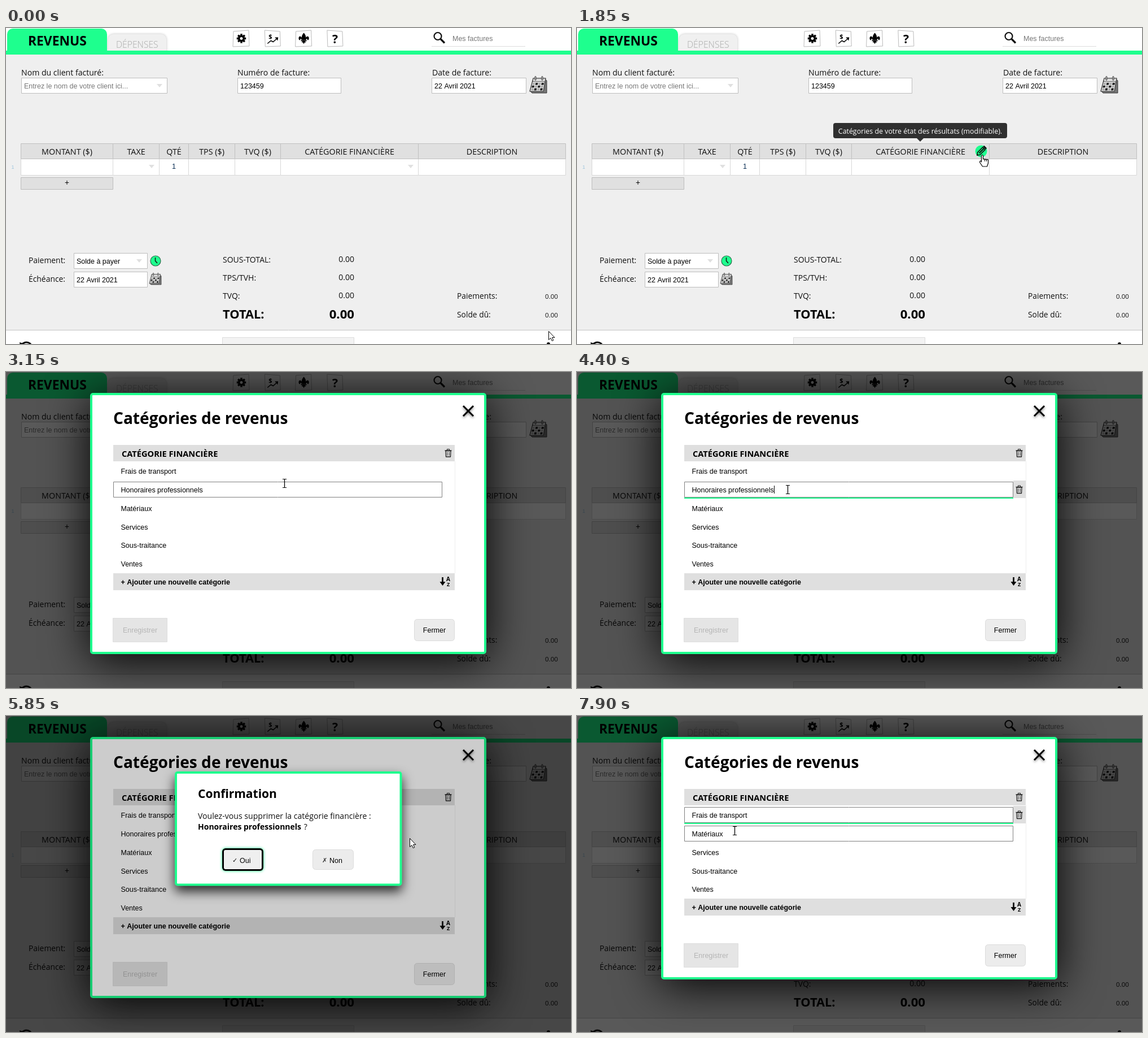
Animation, 1001 px wide and 559 px high, one loop 8000 ms. Source, as an HTML page with a canvas:

```html
<!DOCTYPE html>
<html lang="fr">
<head>
<meta charset="utf-8">
<style>
html, body { margin: 0; width: 100%; height: 100%; overflow: hidden; background: #efefef; }
canvas { display: block; width: 1001px; height: 559px; }
</style>
</head>
<body>
<canvas id="stage" width="1001" height="559"></canvas>
<script>
const c = document.getElementById('stage').getContext('2d');
const LOOP = 8000, GREEN = '#1eff8e', TAU = Math.PI * 2;
const UI = '"Open Sans", "Noto Sans", sans-serif';
const ARIAL = '"Liberation Sans", Arial, sans-serif';
const MONO = '"Liberation Mono", monospace';
const ROW = 32.8, ROWS_TOP = 159.2;
const categories = ['Frais de transport', 'Honoraires professionnels', 'Matériaux',
  'Services', 'Sous-traitance', 'Ventes'];

const ramp = (t, from, to) => Math.min(1, Math.max(0, (t - from) / (to - from)));

function text(s, x, y, font, color = '#111', align = 'left') {
  c.font = font;
  c.fillStyle = color;
  c.textAlign = align;
  c.fillText(s, x, y);
}
const ui = (s, x, y, size = 14.1, color, align) => text(s, x, y, `${size}px ${UI}`, color, align);
const bold = (s, x, y, size, color, align) => text(s, x, y, `bold ${size}px ${UI}`, color, align);
const arial = (s, x, y, color, align) => text(s, x, y, `12.5px ${ARIAL}`, color, align);

function box(x, y, w, h, fill, border, r = 0) {
  c.beginPath();
  c.roundRect(border ? x + .5 : x, border ? y + .5 : y, border ? w - 1 : w, border ? h - 1 : h, r);
  if (fill) { c.fillStyle = fill; c.fill(); }
  if (border) { c.strokeStyle = border; c.lineWidth = 1; c.stroke(); }
}
function poly(points, fill, stroke, width = 1, close = true) {
  c.beginPath();
  points.forEach(([x, y]) => c.lineTo(x, y));
  if (close) c.closePath();
  if (fill) { c.fillStyle = fill; c.fill(); }
  if (stroke) { c.strokeStyle = stroke; c.lineWidth = width; c.stroke(); }
}
const line = (x1, y1, x2, y2, color, width = 1) =>
  poly([[x1, y1], [x2, y2]], null, color, width, false);
function disc(x, y, r, fill, stroke, width = 1) {
  c.beginPath();
  c.arc(x, y, r, 0, TAU);
  if (fill) { c.fillStyle = fill; c.fill(); }
  if (stroke) { c.strokeStyle = stroke; c.lineWidth = width; c.stroke(); }
}
function at(x, y, draw, scale = 1, angle = 0) {
  c.save();
  c.translate(x, y);
  c.rotate(angle);
  c.scale(scale, scale);
  draw();
  c.restore();
}
function withShadow(color, blur, dy, draw) {
  c.save();
  c.shadowColor = color;
  c.shadowBlur = blur;
  c.shadowOffsetY = dy;
  draw();
  c.restore();
}
const dropArrow = (x, y) => poly([[x - 5, y - 3], [x + 5, y - 3], [x, y + 3]], '#e0e0e0');

function calendar(x, y, scale) {
  at(x, y, () => {
    poly([[26, 5], [30, 8], [30, 30], [4, 30], [1, 27]], '#777', '#333');
    poly([[6, 4], [28, 4], [24, 27], [0, 27]], '#f4f4f4', '#333', 1.2);
    poly([[6, 4], [28, 4], [27, 10], [5, 10]], '#ddd', '#444');
    for (let row = 0; row < 3; row++)
      for (let col = 0; col < 4; col++) {
        const px = 5 + col * 5.3 - row * 1.1, py = 12 + row * 4.8;
        poly([[px, py], [px + 4.3, py], [px + 3.6, py + 3.8], [px - .7, py + 3.8]],
          (row + col) % 2 ? '#222' : '#aaa');
      }
    [10, 22].forEach(px => box(px - 1.5, 0, 3, 8, '#eee', '#333', 1));
  }, scale);
}

function trash(x, y) {
  c.lineJoin = 'round';
  poly([[x - 4.5, y - 4], [x + 4.5, y - 4], [x + 4, y + 6.5], [x - 4, y + 6.5]], null, '#222', 1.3);
  line(x - 6, y - 4.5, x + 6, y - 4.5, '#222', 1.4);
  poly([[x - 2, y - 5], [x - 2, y - 7], [x + 2, y - 7], [x + 2, y - 5]], null, '#222', 1.1, false);
  [-1.7, 1.7].forEach(d => line(x + d, y - 2, x + d, y + 4.5, '#222', 1));
}

function gear() {
  for (let i = 0; i < 8; i++) at(0, 0, () => box(-1.8, -8.2, 3.6, 5, '#000'), 1, i * TAU / 8);
  disc(0, 0, 4.3, null, '#000', 3.6);
}
function chart() {
  text('$', -4, 0, `bold 11px ${UI}`, '#000', 'center');
  poly([[-9, 9], [-3, 4], [1, 6], [9, -1]], null, '#000', 1.5, false);
  poly([[4, -2], [10, -2], [9, 4]], '#000');
}
function lily() {
  c.fillStyle = '#000';
  c.beginPath();
  c.moveTo(0, -10);
  c.bezierCurveTo(5, -4, 4, -1, 1.8, 3);
  c.lineTo(-1.8, 3);
  c.bezierCurveTo(-4, -1, -5, -4, 0, -10);
  c.fill();
  [-1, 1].forEach(s => {
    c.beginPath();
    c.moveTo(s * 2, 3);
    c.bezierCurveTo(s * 3, -5, s * 10, -6, s * 9, 1);
    c.bezierCurveTo(s * 8, 4, s * 6, 3, s * 6, 1);
    c.bezierCurveTo(s * 5, 0, s * 4, 1, s * 4, 3);
    c.fill();
  });
  box(-5, 3, 10, 1.8, '#000');
  poly([[-1.5, 4], [1.5, 4], [4, 7], [1.5, 7], [0, 10], [-1.5, 7], [-4, 7]], '#000');
}
const help = () => text('?', 0, 8, `bold 21px ${UI}`, '#000', 'center');

function header() {
  box(0, 0, 1001, 40, '#fff');
  withShadow('rgba(0,0,0,.25)', 4, 0, () => box(181, 11, 103, 40, '#f0f0f0', null, 9));
  text('DÉPENSES', 195, 35, `300 15.7px ${UI}`, '#aaa');
  box(2, 1, 177, 50, GREEN, null, 10);
  box(0, 40, 1001, 7, GREEN);
  box(0, 47, 1001, 10, '#efefef');
  bold('REVENUS', 39, 31, 22.8, '#000');
  [gear, chart, lily, help].forEach((icon, i) => {
    const x = 402 + i * 55.3, tilt = i % 2 ? 1 : -1;
    poly([[x + 1, 5 - tilt], [x + 28, 5 + tilt], [x + 29, 32], [x + 1 + tilt, 33]], '#fff', '#bbb');
    at(x + 15, 18.5, icon);
  });
  disc(765, 14.5, 6.5, null, '#111', 2.2);
  line(770, 19.5, 777, 26.5, '#111', 3.2);
  arial('Mes factures', 791, 22.5, '#777');
  line(754, 32.5, 920, 32.5, '#ddd');
}

function field(x, y, w, h, value, color) {
  box(x, y, w, h, '#fff', '#bdbdbd');
  arial(value, x + 5, y + h / 2 + 5, color);
}

function invoiceTable(hot) {
  const cols = [26, 189, 271, 323, 405, 486, 730, 991];
  const titles = ['MONTANT ($)', 'TAXE', 'QTÉ', 'TPS ($)', 'TVQ ($)', 'CATÉGORIE FINANCIÈRE', 'DESCRIPTION'];
  titles.forEach((title, i) => {
    const x = cols[i], w = cols[i + 1] - x + 1;
    box(x, 231, w, 30, '#fff', '#d8d8d8');
    box(x, 204, w, 28, '#e0e0e0', '#c0c0c0');
    ui(title, x + w / 2, 224, 14.3, '#111', 'center');
  });
  text('1', 12, 249, `9px ${ARIAL}`, '#9cc4de', 'center');
  arial('1', 297.5, 249, '#0b2f55', 'center');
  dropArrow(258, 245);
  if (!hot) dropArrow(717, 245);
  box(26, 264, 164, 22, '#e0e0e0', '#bcbcbc');
  ui('+', 108, 279, 14, '#000', 'center');
}

function page(hot) {
  box(0, 0, 1001, 559, '#efefef');
  header();
  ui('Nom du client facturé:', 27, 84);
  field(27, 88, 259, 28, 'Entrez le nom de votre client ici...', '#777');
  dropArrow(272, 102);
  ui('Numéro de facture:', 410, 84);
  field(410, 88, 184, 28, '123459', '#000');
  ui('Date de facture:', 755, 84);
  field(754, 88, 168, 28, '22 Avril 2021', '#000');
  calendar(928, 85, 1);
  invoiceTable(hot);

  ui('Paiement:', 40, 416, 13.9);
  field(120, 398, 131, 28, 'Solde à payer', '#000');
  dropArrow(236, 412);
  disc(265, 412, 9, GREEN, '#2a6b4b', 1.2);
  poly([[264.5, 406], [264.5, 412], [268, 416]], null, '#111', 1.5, false);
  ui('Échéance:', 40, 449, 13.9);
  field(120, 431, 131, 28, '22 Avril 2021', '#000');
  calendar(254, 433, .7);

  ['SOUS-TOTAL:', 'TPS/TVH:', 'TVQ:'].forEach((label, i) => {
    ui(label, 384, 414.5 + i * 32, 14);
    ui('0.00', 617, 414 + i * 32, 14, '#111', 'right');
  });
  bold('TOTAL:', 384, 514, 21.8, '#000');
  bold('0.00', 617, 514, 22.2, '#000', 'right');
  ['Paiements:', 'Solde dû:'].forEach((label, i) => {
    ui(label, 799, 479 + i * 33, 13.8);
    ui('0.00', 978, 479 + i * 33, 11.6, '#111', 'right');
  });

  box(0, 534, 1001, 25, '#fff');
  line(0, 534.5, 1001, 534.5, '#c4c4c4');
  box(383, 547, 234, 20, '#f3f3f3', '#dcdcdc');
  c.beginPath();
  c.arc(36, 566, 10, Math.PI * 1.12, TAU);
  c.strokeStyle = '#111';
  c.lineWidth = 3;
  c.stroke();
  poly([[24, 556], [34, 559], [25, 563]], '#111');
  disc(961, 559, 3, '#111');
}

function pencil() {
  disc(716, 218, 10.5, GREEN);
  at(716, 218, () => {
    poly([[-10, 0], [-6, -3], [7, -3], [7, 3], [-6, 3]], GREEN, '#111', 1.6);
    box(-5, -1, 12, 2, '#111');
    box(8, -3.5, 3, 7, '#111', null, 1);
    poly([[-11, 0], [-8, -1.7], [-8, 1.7]], '#111');
  }, 1, -Math.PI / 4);
}

function headerTip() {
  box(454, 168, 308, 27, '#303030', null, 4);
  poly([[601, 194], [615, 194], [608, 201]], '#303030');
  ui('Catégories de votre état des résultats (modifiable).', 608, 186.5, 12.4, '#fff', 'center');
}

function trashTip() {
  box(407, 194, 356, 29, '#404040', null, 4);
  poly([[762, 201], [770, 208.5], [762, 216]], '#404040');
  ui('Supprimer la catégorie. Raccourci clavier :', 416, 213, 12.4, '#fff');
  ui('+', 697, 213, 12.4, '#fff', 'center');
  [['Alt', 659, 30], ['Delete', 705, 50]].forEach(([key, x, w]) => {
    box(x, 202, w, 16, '#eee', '#fff', 3);
    text(key, x + w / 2, 213.5, `11px ${MONO}`, '#222', 'center');
  });
}

function frame(x, y, w, h, shadow, blur) {
  withShadow(shadow, blur, 10, () => box(x, y, w, h, GREEN, null, 5));
  box(x + 4, y + 4, w - 8, h - 8, '#fff', null, 1);
}

function modal({ rows, hover, focus, caret }) {
  const bar = Math.round(ROWS_TOP + rows.length * ROW);
  frame(149, 37, 702, bar + 106, '#000', 80);
  bold('Catégories de revenus', 190, 92, 28.1, '#000');
  withShadow('rgba(0,0,0,.5)', 4, 2, () => {
    line(810, 60, 828, 78, '#000', 3);
    line(828, 60, 810, 78, '#000', 3);
  });
  box(190, 129, 605, 29, '#dfdfdf');
  bold('CATÉGORIE FINANCIÈRE', 205, 150, 14.6, '#000');
  trash(783.5, 143.5);
  line(795.5, 158, 795.5, bar, '#eee');
  rows.forEach((name, i) => {
    const y = Math.round(ROWS_TOP + i * ROW + 2);
    if (i === focus) {
      box(773, y - 2, 22, 31, '#dfdfdf');
      trash(783.5, y + 14);
    }
    if (i === hover || i === focus) box(190, y, 583, 28, '#fff', '#808080');
    if (i === focus) box(190, y + 28, 583, 2, GREEN);
    arial(name, 203.5, y + 18.5, '#000');
    if (i === focus && caret)
      box(Math.round(204 + c.measureText(name).width), y + 7, 1, 14, '#000');
  });
  box(190, bar, 605, 30, '#dfdfdf');
  text('+ Ajouter une nouvelle catégorie', 203.5, bar + 19.5, `bold 12.5px ${ARIAL}`, '#000');
  line(773.5, bar + 7, 773.5, bar + 18, '#000', 2.6);
  poly([[768.5, bar + 15], [778.5, bar + 15], [773.5, bar + 22]], '#000');
  text('A', 783.5, bar + 14, `bold 10px ${UI}`, '#000', 'center');
  text('Z', 783.5, bar + 23, `bold 9px ${UI}`, '#000', 'center');
  box(189, bar + 79, 97, 43, '#e5e5e5', '#dedede');
  arial('Enregistrer', 237.5, bar + 105, '#b5b5b5', 'center');
  box(723, bar + 81, 72, 39, '#ececec', '#dcdcdc', 5);
  arial('Fermer', 759, bar + 105, '#000', 'center');
}

function confirmation() {
  frame(299, 98, 402.5, 202.5, 'rgba(0,0,0,.8)', 20);
  bold('Confirmation', 340, 145, 21, '#000');
  ui('Voulez-vous supprimer la catégorie financière :', 340, 182);
  bold('Honoraires professionnels', 340, 201, 14, '#000');
  ui(' ?', 524, 201);
  withShadow(GREEN, 5, 0, () => box(383, 234, 73, 40, '#000', null, 6));
  box(386, 237, 67, 34, '#efefef', null, 3);
  box(543, 236, 73, 36, '#ececec', '#dcdcdc', 5);
  text('✓', 401, 259, '11px "DejaVu Sans", sans-serif', '#111');
  arial('Oui', 414, 259.5, '#000');
  text('✗', 560, 259, '11px "DejaVu Sans", sans-serif', '#333');
  arial('Non', 573, 259.5, '#000');
}

const track = [
  [50, 961, 536], [250, 915, 465], [500, 800, 325], [700, 737, 250], [850, 721, 229],
  [1750, 718, 224], [2600, 718, 224], [2650, 717, 223], [2800, 717, 223],
  [2950, 640, 207], [3150, 493, 197], [3400, 415, 184], [3600, 395, 177],
  [3850, 378, 202], [4250, 372, 208], [4400, 372, 208], [4600, 480, 211],
  [4800, 715, 209], [4950, 787, 208], [5600, 787, 208], [5720, 765, 209],
  [5850, 716, 216], [6000, 585, 246], [6150, 500, 254], [6500, 435, 256],
  [7550, 435, 256], [7700, 385, 243], [7900, 279, 203]
];
function pointer(t) {
  const next = track.findIndex(k => k[0] > t);
  if (next === 0) return track[0].slice(1);
  if (next < 0) return track[track.length - 1].slice(1);
  const [t0, x0, y0] = track[next - 1], [t1, x1, y1] = track[next];
  const p = ramp(t, t0, t1);
  return [Math.round(x0 + (x1 - x0) * p), Math.round(y0 + (y1 - y0) * p)];
}
function pointerKind(t) {
  if ((t >= 850 && t < 2250) || (t >= 4850 && t < 5600)) return hand;
  if ((t >= 2850 && t < 4850) || t >= 7600) return beam;
  return arrow;
}
function arrow() {
  poly([[.5, .5], [.5, 15.5], [4, 12.5], [6.3, 17.5], [8.8, 16.5], [6.6, 11.5], [11, 11.5]],
    '#fff', '#000', 1);
}
function beam() {
  line(.5, -7, .5, 7, '#000', 1.3);
  [-7.5, 7.5].forEach(y => line(-3, y, 4, y, '#000', 1));
}
function hand() {
  c.lineJoin = 'round';
  c.beginPath();
  c.moveTo(-1.5, 13);
  c.lineTo(-1.5, 2);
  c.quadraticCurveTo(0, -1, 1.5, 2);
  c.lineTo(1.5, 8);
  [4.5, 7.5, 10.5].forEach(x => {
    c.quadraticCurveTo(x - 1.5, 5.5 + x / 4, x, 9);
  });
  c.lineTo(10.5, 15);
  c.lineTo(8.5, 21);
  c.lineTo(.5, 21);
  c.lineTo(-4.5, 13.5);
  c.quadraticCurveTo(-4.5, 9.5, -1.5, 12.5);
  c.closePath();
  c.fillStyle = '#fff';
  c.fill();
  c.strokeStyle = '#000';
  c.lineWidth = 1.2;
  c.stroke();
  [4.5, 7.5].forEach(x => line(x, 9, x, 12, '#000', 1));
}

function fade(alpha, draw) {
  if (alpha <= 0) return;
  c.save();
  c.globalAlpha = alpha;
  draw();
  c.restore();
}
const dim = amount => box(0, 0, 1001, 559, `rgba(0,0,0,${amount})`);

function modalState(t, kind, y) {
  const deleted = t >= 7350;
  const focusedAt = deleted ? 7350 : 3950;
  const focused = deleted || (t >= 3950 && t < 5550);
  return {
    rows: deleted ? categories.filter((_, i) => i !== 1) : categories,
    hover: kind === beam ? Math.floor((y - ROWS_TOP) / ROW) : -1,
    focus: focused ? (deleted ? 0 : 1) : -1,
    caret: Math.floor((t - focusedAt) / 500) % 2 === 0
  };
}

function render(t) {
  const [x, y] = pointer(t), kind = pointerKind(t);
  const hot = t >= 800;
  page(hot);
  if (hot && t < 2300) {
    pencil();
    fade(ramp(t, 950, 1150), headerTip);
  }
  fade(ramp(t, 2100, 2300), () => {
    dim(.65);
    modal(modalState(t, kind, y));
  });
  if (t < 5550) fade(ramp(t, 5150, 5300), trashTip);
  if (t < 7350) fade(ramp(t, 5550, 5750), () => {
    dim(.2);
    confirmation();
  });
  at(x, y, kind);
}

function tick() {
  render(performance.now() % LOOP);
  requestAnimationFrame(tick);
}
tick();
</script>
</body>
</html>
```
